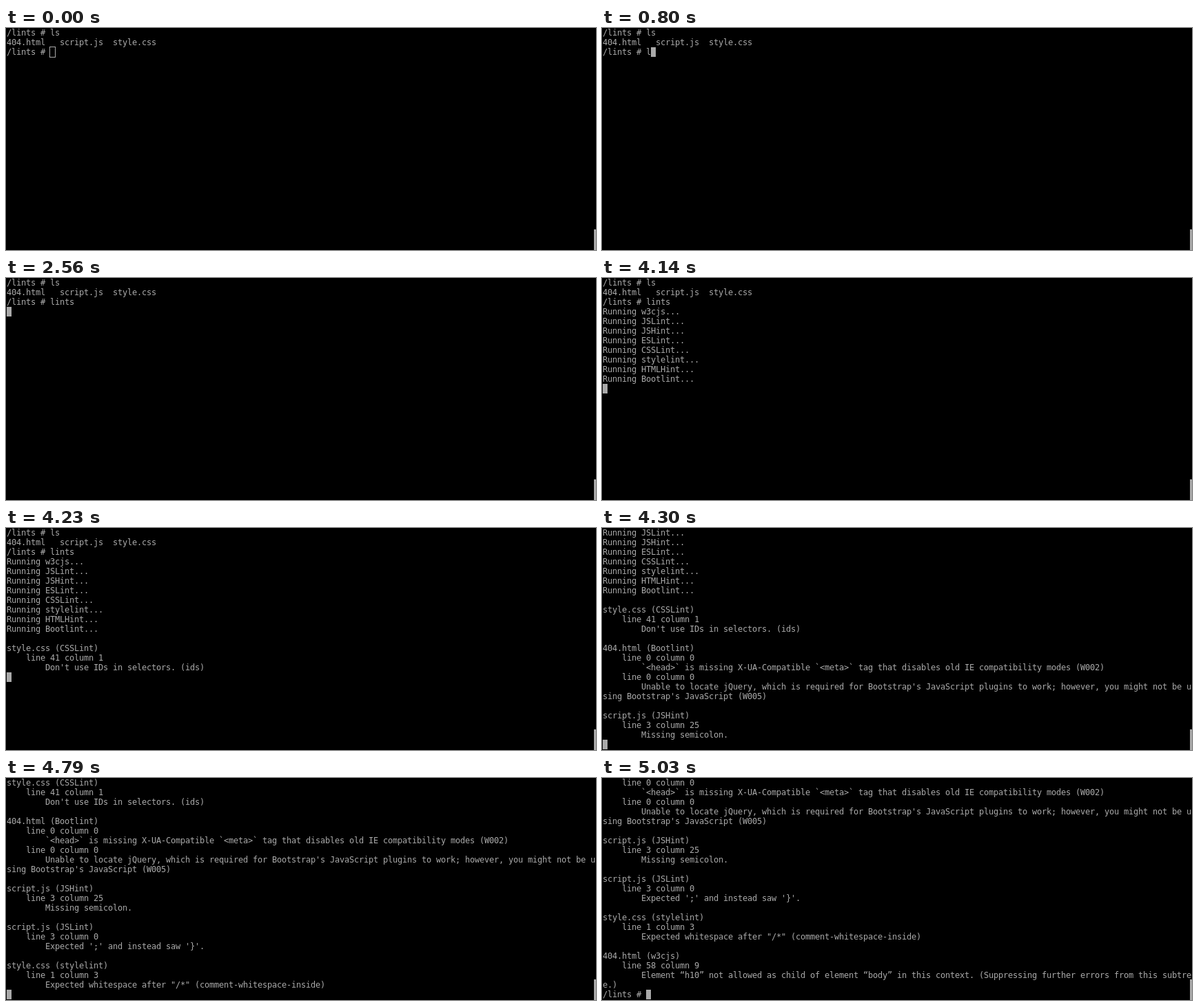
An HTML page with a canvas for the animation above (9950 ms loop, 856x323 px).

```html
<!DOCTYPE html>
<html lang="en">
<head>
<meta charset="utf-8">
<title>Terminal: lints</title>
<style>
  html, body { margin: 0; width: 100%; height: 100%; overflow: hidden; background: #000; }
  canvas { display: block; }
</style>
</head>
<body>
<canvas id="screen" width="856" height="323"></canvas>
<script>
const ctx = document.getElementById('screen').getContext('2d');

const LOOP = 9950;
const COLS = 122, ROWS = 23;
const CELL_W = 7, CELL_H = 14, LEFT = 1, BASELINE = 11;
const INK = '#aaaaaa';
const PROMPT = '/lints # ';

const running = ['w3cjs', 'JSLint', 'JSHint', 'ESLint', 'CSSLint', 'stylelint', 'HTMLHint', 'Bootlint']
  .map(tool => `Running ${tool}...\n`).join('');

// One report: a file, the tool, then [line, column, message] entries.
const report = (file, tool, ...issues) =>
  `\n${file} (${tool})\n` + issues.map(([line, column, message]) =>
    `    line ${line} column ${column}\n        ${message}\n`).join('');

// What the terminal prints, and when.
const output = [
  [0, `${PROMPT}ls\n404.html   script.js  style.css\n${PROMPT}`],
  [800, 'l'], [1020, 'i'], [1190, 'n'], [1330, 't'], [1600, 's'],
  [2560, '\n'],
  [4140, running],
  [4230, report('style.css', 'CSSLint', [41, 1, "Don't use IDs in selectors. (ids)"])],
  [4300, report('404.html', 'Bootlint',
      [0, 0, '`<head>` is missing X-UA-Compatible `<meta>` tag that disables old IE compatibility modes (W002)'],
      [0, 0, "Unable to locate jQuery, which is required for Bootstrap's JavaScript plugins to work; however, you might not be using Bootstrap's JavaScript (W005)"]) +
    report('script.js', 'JSHint', [3, 25, 'Missing semicolon.'])],
  [4670, report('script.js', 'JSLint', [3, 0, "Expected ';' and instead saw '}'."])],
  [4790, report('style.css', 'stylelint', [1, 3, 'Expected whitespace after "/*" (comment-whitespace-inside)'])],
  [5030, report('404.html', 'w3cjs',
      [58, 9, 'Element “h10” not allowed as child of element “body” in this context. (Suppressing further errors from this subtree.)']) +
    PROMPT]
];
const FOCUS_AT = 90;

function wrap(text) {
  return text.split('\n').flatMap(line => {
    const rows = [];
    do {
      rows.push(line.slice(0, COLS));
      line = line.slice(COLS);
    } while (line);
    return rows;
  });
}

function drawCursor(col, row, focused) {
  const x = LEFT + col * CELL_W, y = row * CELL_H;
  if (focused) {
    ctx.fillRect(x, y, CELL_W, CELL_H);
  } else {
    ctx.strokeRect(x - 0.5, y - 0.5, CELL_W + 1, CELL_H + 1);
  }
}

function draw(time) {
  const text = output.filter(([at]) => at <= time).map(([, part]) => part).join('');
  const rows = wrap(text).slice(-ROWS);

  ctx.fillStyle = '#000';
  ctx.fillRect(0, 0, 856, 323);
  ctx.fillStyle = ctx.strokeStyle = INK;
  ctx.lineWidth = 1;
  ctx.font = '12px "DejaVu Sans Mono", monospace';

  rows.forEach((line, row) => [...line].forEach((char, col) => {
    if (char !== ' ') ctx.fillText(char, LEFT + col * CELL_W, row * CELL_H + BASELINE);
  }));
  drawCursor(rows[rows.length - 1].length, rows.length - 1, time >= FOCUS_AT);

  // Scrollbar thumb
  ctx.fillRect(853, 293, 3, 30);
}

const start = performance.now();
function tick() {
  draw((performance.now() - start) % LOOP);
  requestAnimationFrame(tick);
}
tick();
</script>
</body>
</html>
```
